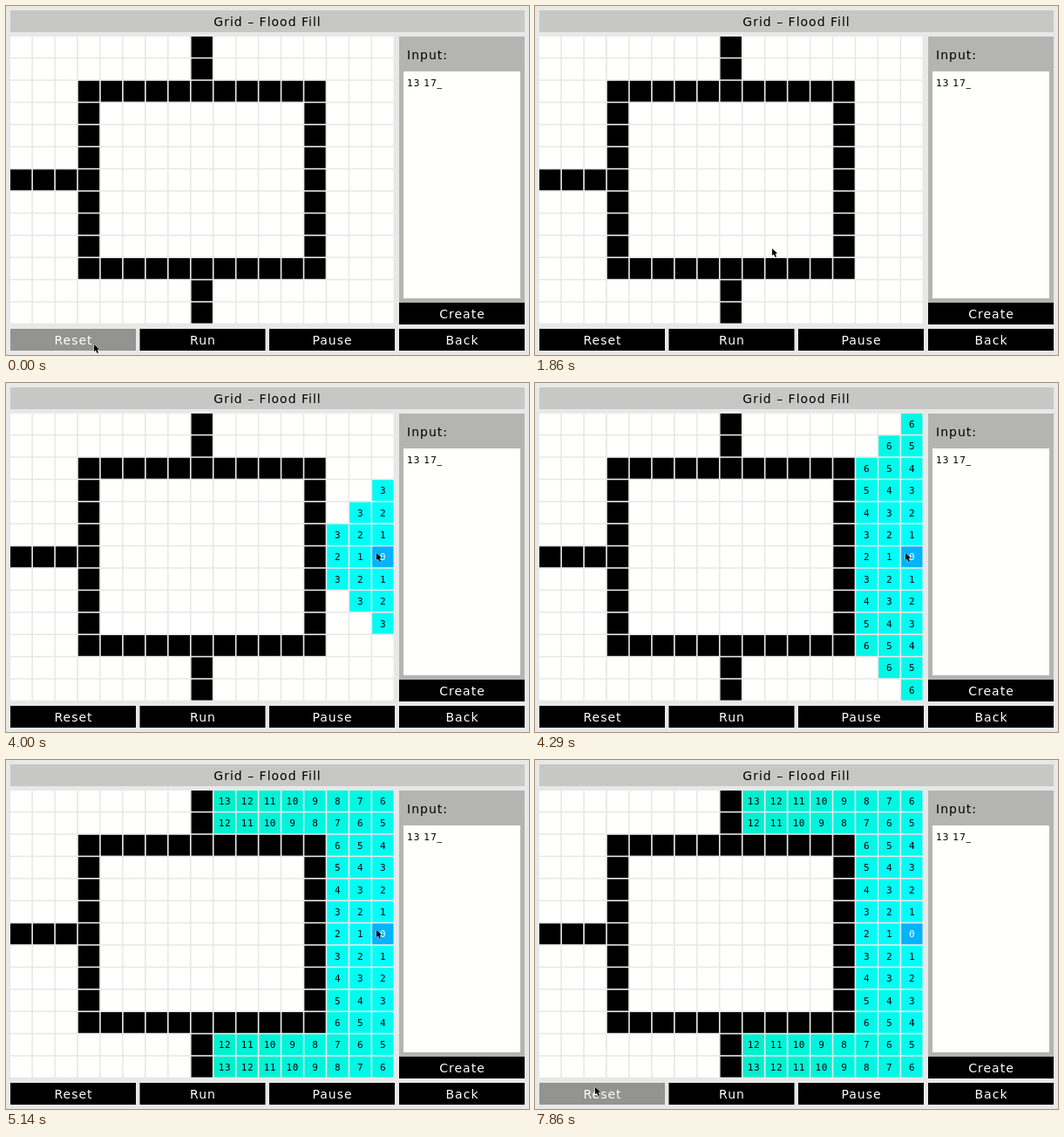
Write an HTML page with a canvas that moves like this. It is 600 by 400 pixels and loops after 8000 ms.

```html
<!DOCTYPE html>
<html lang="en">
<head>
<meta charset="utf-8">
<title>Grid – Flood Fill</title>
<style>
  html, body { margin: 0; width: 100%; height: 100%; overflow: hidden; background: #e8e8e8; }
  canvas { display: block; }
</style>
</head>
<body>
<canvas id="stage" width="600" height="400"></canvas>
<script>
const ctx = document.getElementById('stage').getContext('2d');
const LOOP = 8000, TICK = 1000 / 7;
const COLS = 17, ROWS = 13, CELL_W = 25.95, CELL_H = 25.4;
const SOURCE = { col: 16, row: 6 };
const WHITE = '#fffffe', BLACK = '#000';

// Pointer keys: time, x, y, and the easing that leads to the key.
const linear = u => u;
const easeIn = u => u ** 1.8;
const easeOut = power => u => 1 - (1 - u) ** power;
const POINTER = [
  [0, 101, 388, linear],
  [857, 101, 388, linear],
  [1857, 272, 278, easeIn],
  [2000, 316, 256, linear],
  [3143, 425, 195, easeOut(3)],
  [6000, 425, 195, linear],
  [6429, 376, 225, easeIn],
  [7143, 201, 315, linear],
  [7857, 69, 375, easeOut(1.3)]
];

function pointerAt(t) {
  const next = POINTER.findIndex(key => key[0] > t);
  if (next < 0) return POINTER.at(-1).slice(1, 3);
  const [t0, x0, y0] = POINTER[next - 1];
  const [t1, x1, y1, ease] = POINTER[next];
  const u = ease((t - t0) / (t1 - t0));
  return [x0 + (x1 - x0) * u, y0 + (y1 - y0) * u];
}

function box(x, y, w, h, color) {
  ctx.fillStyle = color;
  ctx.fillRect(x, y, w, h);
}

function label(text, x, y, { size = 14, color = BLACK, align = 'center', family = '"DejaVu Sans", sans-serif' } = {}) {
  ctx.font = `${size}px ${family}`;
  ctx.letterSpacing = size > 12 ? '1px' : '0.6px';
  ctx.textAlign = align;
  ctx.fillStyle = color;
  ctx.fillText(text, x, y);
}

function button(text, x, y, color = BLACK) {
  box(x, y, 144, 25, color);
  label(text, x + 72.5, y + 18, { color: WHITE });
}

function isWall(c, r) {
  const inRing = c >= 3 && c <= 13 && r >= 2 && r <= 10;
  if (inRing) return c === 3 || c === 13 || r === 2 || r === 10;
  return c === 8 || (r === 6 && c < 3);
}

const isReachable = (c, r) => c > 13 || (c > 8 && (r < 2 || r > 10));

function cellColor(c, r, distance, level) {
  if (isWall(c, r)) return BLACK;
  if (!isReachable(c, r) || distance > level) return WHITE;
  return distance ? `rgb(0, ${256 - 1.3 * distance}, ${254 - 3.8 * distance})` : '#00b4ff';
}

function drawGrid(level) {
  for (let r = 0; r < ROWS; r++) {
    for (let c = 0; c < COLS; c++) {
      const x = 5 + c * CELL_W, y = 35 + r * CELL_H;
      const distance = Math.abs(c - SOURCE.col) + Math.abs(r - SOURCE.row);
      box(x, y, 24.3, 23.8, cellColor(c, r, distance, level));
      if (isReachable(c, r) && distance <= level) {
        label(distance, x + 12.4, y + 16, {
          size: 11, color: distance ? BLACK : WHITE, family: '"DejaVu Sans Mono", monospace'
        });
      }
    }
  }
}

function drawPointer(x, y) {
  const arrow = new Path2D('M0 0V8L2 6.5L3.5 10L5 9.3L3.6 6L6 5.6Z');
  ctx.save();
  ctx.translate(x, y);
  ctx.strokeStyle = WHITE;
  ctx.lineWidth = 0.8;
  ctx.stroke(arrow);
  ctx.fillStyle = BLACK;
  ctx.fill(arrow);
  ctx.restore();
}

function draw(now) {
  const t = Math.floor((now % LOOP + 4) / TICK) * TICK + 0.01;
  const [x, y] = pointerAt(t);
  const level = t < 3850 ? -1 : Math.floor((t - 3585) / 115);
  const overReset = x < 149 && y >= 370;

  box(0, 0, 600, 400, '#e8e8e8');
  box(5, 5, 590, 25, '#c7c7c6');
  label('Grid – Flood Fill', 300, 22.5);
  drawGrid(level);

  box(451, 35, 144, 305, '#b4b4b3');
  label('Input:', 460, 61, { align: 'left' });
  box(456, 75, 134, 260, WHITE);
  label('13 17_', 460, 92, { size: 11, align: 'left' });
  button('Create', 451, 340);

  button('Reset', 5, 370, overReset ? '#939392' : BLACK);
  button('Run', 153.5, 370);
  button('Pause', 302, 370);
  button('Back', 451, 370);
  drawPointer(x, y);
}

const start = performance.now();
function loop() {
  draw(performance.now() - start);
  requestAnimationFrame(loop);
}
loop();
</script>
</body>
</html>
```
